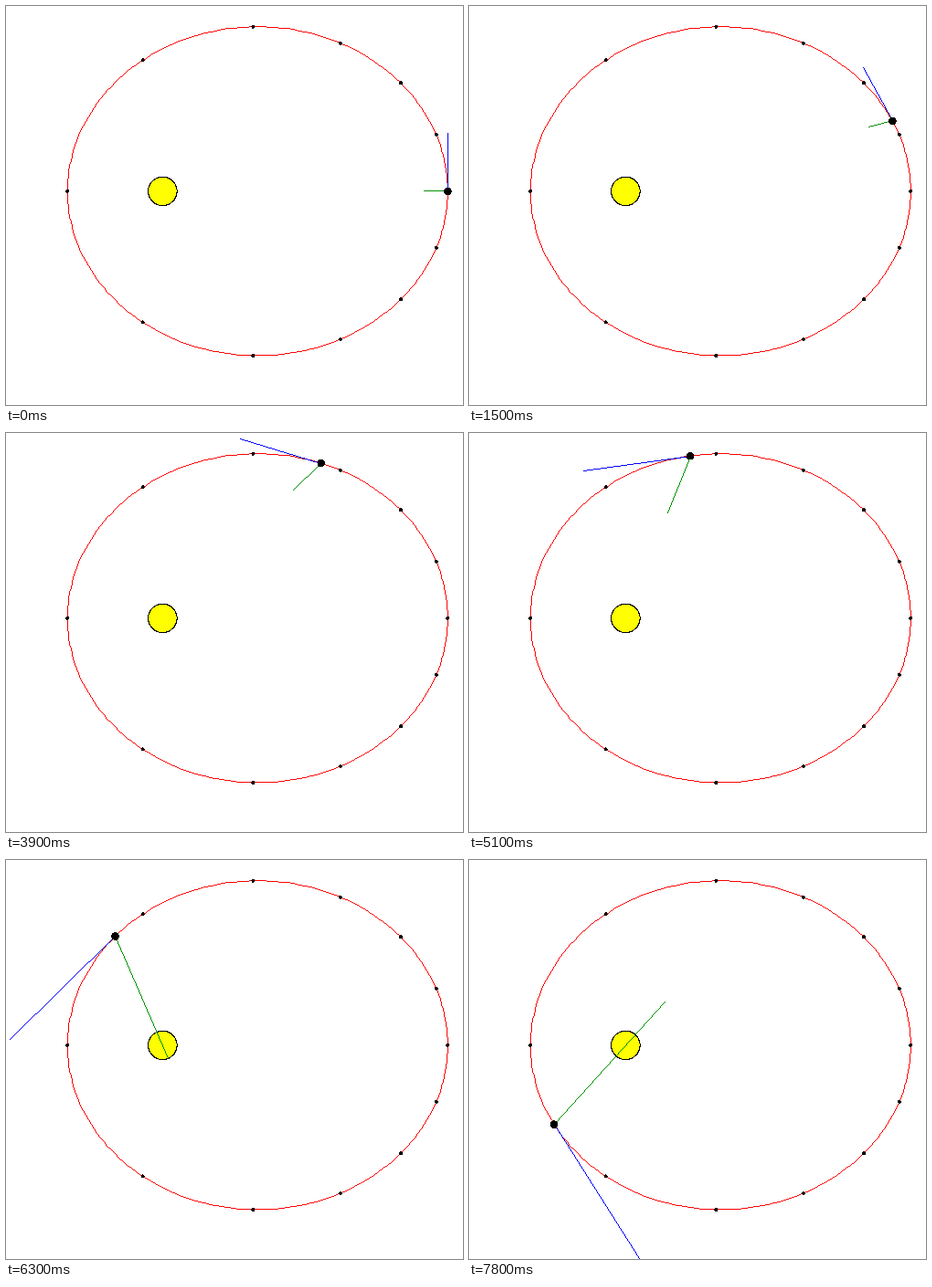
A matplotlib script that plays this animation: 500 by 437 pixels, repeating every 8000 ms.

```python
import math

import matplotlib.pyplot as plt
import numpy as np
from matplotlib.animation import FuncAnimation
from matplotlib.collections import PolyCollection

WIDTH, HEIGHT, DPI = 500, 437, 100
CX, CY = 275.34, 202.83            # centre of the orbit
A, ECC = 208, 0.5
B = A * math.sqrt(1 - ECC ** 2)
SUN = np.array([CX - A * ECC, CY])
SUN_R, PLANET_R, MARK_R = 15.75, 4.3, 2
MARKS, STEPS = 12, 48              # equal-time dots and steps per revolution
RATE = 2 * math.pi / MARKS         # arrows use one dot interval as unit of time
TICK, HOLD, FRAMES = 100, 3, 80
UNIT_SQUARE = np.array([[0, 0], [1, 0], [1, 1], [0, 1]])


def solve_angle(mean):
    """Eccentric angle measured from aphelion, by Newton's method."""
    angle = mean
    for _ in range(30):
        angle -= (angle + ECC * math.sin(angle) - mean) / (1 + ECC * math.cos(angle))
    return angle


def ellipse(center, rx, ry, angle):
    return np.stack([center[0] + rx * np.cos(angle),
                     center[1] - ry * np.sin(angle)], axis=-1)


def place(angle):
    return ellipse((CX, CY), A, B, angle)


def velocity(angle):
    speed = RATE / (1 + ECC * math.cos(angle))
    return np.array([-A * math.sin(angle), -B * math.cos(angle)]) * speed


def acceleration(angle):
    to_sun = SUN - place(angle)
    return to_sun * RATE ** 2 * A ** 3 / np.hypot(*to_sun) ** 3


def trace(points):
    """Pixels of a polyline one pixel thick."""
    corners = np.floor(points)
    runs = []
    for start, end in zip(corners, corners[1:]):
        count = int(np.abs(end - start).max()) + 1
        runs.append(np.floor(np.linspace(start, end, count) + 0.5))
    return np.unique(np.concatenate(runs), axis=0)


def disc(center, radius):
    """Pixels whose centres lie inside a circle."""
    reach = np.arange(-math.ceil(radius) - 1, math.ceil(radius) + 2)
    grid = np.stack(np.meshgrid(reach, reach), axis=-1).reshape(-1, 2)
    cells = np.floor(center) + grid
    return cells[np.hypot(*(cells + 0.5 - center).T) <= radius]


def squares(cells):
    return cells[:, None, :] + UNIT_SQUARE


fig = plt.figure(figsize=(WIDTH / DPI, HEIGHT / DPI), dpi=DPI, facecolor="white")
ax = fig.add_axes([0, 0, 1, 1])
ax.set(xlim=(0, WIDTH), ylim=(HEIGHT, 0))
ax.axis("off")


def add_pixels(cells, color, zorder):
    layer = PolyCollection(squares(cells), facecolors=color, edgecolors="none",
                           linewidths=0, antialiaseds=False, zorder=zorder)
    return ax.add_collection(layer, autolim=False)


turn = np.linspace(0, 2 * math.pi, 201)
add_pixels(disc(SUN, SUN_R), "yellow", 1)
add_pixels(trace(ellipse(SUN, SUN_R, SUN_R, turn)), "black", 2)
add_pixels(trace(place(turn)), "red", 2)
for i in range(MARKS):
    add_pixels(disc(place(solve_angle(i * RATE)), MARK_R), "black", 5)

home = place(0)
velocity_line = add_pixels(trace([home, home]), "blue", 3)
pull_line = add_pixels(trace([home, home]), "#009000", 4)
planet = add_pixels(disc(home, PLANET_R), "black", 6)


def update(frame):
    angle = solve_angle(2 * math.pi * (frame // HOLD) / STEPS)
    pos = place(angle)
    velocity_line.set_verts(squares(trace([pos, pos + velocity(angle)])))
    pull_line.set_verts(squares(trace([pos, pos + acceleration(angle)])))
    planet.set_verts(squares(disc(pos, PLANET_R)))
    return velocity_line, pull_line, planet


anim = FuncAnimation(fig, update, frames=FRAMES, interval=TICK, repeat=True,
                     repeat_delay=0)
plt.show()
```
